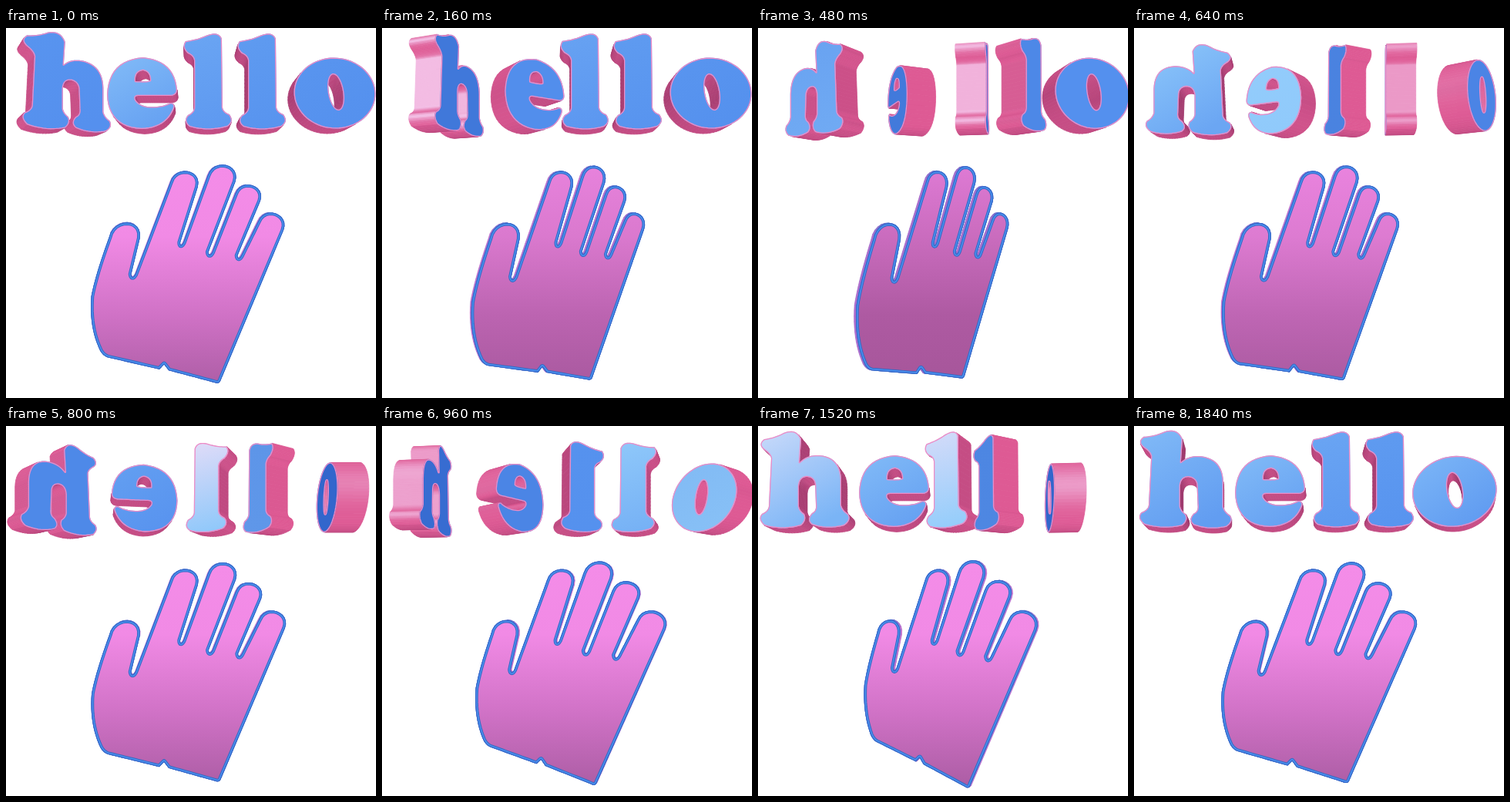
Animation, 480 px wide and 480 px high, one loop 1.92 s. Source, as an HTML page with a canvas:

```html
<!DOCTYPE html>
<html lang="en">
<head>
<meta charset="utf-8">
<title>hello</title>
<style>
html, body { margin: 0; width: 100%; height: 100%; overflow: hidden; background: #fff; }
canvas { display: block; width: 100vw; height: 100vh; }
</style>
</head>
<body>
<canvas id="stage" width="480" height="480" aria-label="hello"></canvas>
<script>
const ctx = document.getElementById('stage').getContext('2d');
const LOOP = 1920, STEP = 80, MID = 240, FOCAL = 630, DEPTH = 37;
const SPIN = 1480, FIRST = -122, STAGGER = 138;

// Outlines as seen at rest, in stage pixels
const H = 'M8 17 Q22 15 33 9 Q50 2 56 17 L54 47 Q64 37 80 38 Q107 40 108 70 L108 103 Q110 110 117 114 Q122 122 112 129 Q90 135 70 128 Q62 122 70 113 Q76 110 75 102 L74 76 Q73 67 64 66 Q54 66 53 78 L53 104 Q54 110 60 114 Q64 122 56 129 Q32 136 8 129 Q-1 121 5 114 Q14 110 14 103 L17 42 Q16 36 8 31 Q-1 24 8 17 Z';
const E = 'M222 80 Q222 88 212 88 L172 88 Q166 88 168 93 Q175 104 196 102 Q206 101 213 97 Q220 97 218 104 Q208 130 176 131 Q132 129 131 86 Q133 41 178 38 Q219 42 222 80 Z M168 69 Q167 56 178 55 Q187 57 187 68 Q184 70 168 69 Z';
const L = 'M233 17 Q248 15 259 10 Q276 3 280 14 L281 103 Q282 109 290 112 Q297 122 287 128 Q262 135 238 128 Q229 121 236 113 Q244 109 244 103 L244 42 Q243 36 236 33 Q227 25 233 17 Z';
const HAND = 'M135 271 C140 245 178 246 174 272 L163 318 Q164 325 168 318 L213 200 C219 178 255 182 249 206 L226 278 Q226 285 230 278 L262 191 C270 167 307 175 299 199 L263 291 Q264 298 268 291 L299 214 C307 193 341 203 333 224 L302 296 Q303 303 307 296 L330 251 C339 229 374 241 365 263 L279 460 Q277 464 272 462 L211 443 L205 435 L199 441 L134 423 Q128 421 124 414 Q110 384 113 345 Q118 318 135 271 Z';

function sample(path, dx = 0) {
  const rings = [];
  let ring, at;
  for (const [, cmd, args] of path.matchAll(/([MLQCZ])([^MLQCZ]*)/g)) {
    const n = args.trim().split(/\s+/).map(Number);
    const pts = [];
    for (let i = 0; i + 1 < n.length; i += 2) pts.push([n[i] + dx, n[i + 1]]);
    if (cmd === 'Z') continue;
    if (cmd === 'M') { rings.push(ring = [at = pts[0]]); continue; }
    for (let k = 1; k <= 12; k++) ring.push(bezier([at, ...pts], k / 12));
    at = pts[pts.length - 1];
  }
  return rings;
}

function bezier(pts, u) {
  while (pts.length > 1)
    pts = pts.slice(1).map((p, i) => p.map((v, j) => pts[i][j] + (v - pts[i][j]) * u));
  return pts[0];
}

function ellipse(cx, cy, rx, ry, tilt) {
  return Array.from({ length: 72 }, (_, i) => {
    const a = i / 72 * 2 * Math.PI, x = rx * Math.cos(a), y = ry * Math.sin(a);
    return [cx + x * Math.cos(tilt) - y * Math.sin(tilt), cy + x * Math.sin(tilt) + y * Math.cos(tilt)];
  });
}

function area(ring) {
  return ring.reduce((sum, p, i) => {
    const q = ring[(i + 1) % ring.length];
    return sum + p[0] * q[1] - q[0] * p[1];
  }, 0) / 2;
}

// front and back are depths measured from the pivot
function solid(rings, front, back, pivot) {
  const s = (FOCAL - front) / FOCAL;
  rings = rings.map((ring, i) => {
    ring = ring.map(([x, y]) => [(x - MID) * s, (y - MID) * s]);
    ring = ring.filter((p, j) => {
      const q = ring[(j + 1) % ring.length];
      return Math.hypot(p[0] - q[0], p[1] - q[1]) > 0.01;
    });
    return (area(ring) > 0) === (i === 0) ? ring : ring.reverse();
  });
  const xs = rings[0].map(p => p[0]);
  const px = pivot === undefined ? (Math.min(...xs) + Math.max(...xs)) / 2 : pivot - MID;
  return { rings: rings.map(r => r.map(([x, y]) => [x - px, y])), front, back, px };
}

const letters = [
  sample(H), sample(E), sample(L), sample(L, 70),
  [ellipse(426.5, 84.5, 53, 46, 0.08), ellipse(428, 83, 9, 23, -0.17)]
].map(rings => solid(rings, DEPTH, 0));
const hand = solid(sample(HAND), 0, -4, 237);

const clamp = v => Math.max(0, Math.min(1, v));
const mix = (a, b, u) => a.map((v, i) => v + (b[i] - v) * clamp(u));
const rgb = c => `rgb(${c.map(Math.round).join()})`;
const deg = r => r * 180 / Math.PI;
const bell = v => Math.exp(-v * v / 2);

// Highlight on a cap turned by `turn` degrees at distance x from the middle
const shine = (turn, x) => bell((turn + 25 + 0.08 * x) / 15);

function letterFace(turn, box) {
  const base = mix([50, 102, 204], [84, 144, 238], 1.15 * Math.cos(turn * Math.PI / 180));
  const tone = (x, k) => {
    const s = shine(turn, x - MID);
    return rgb(mix(mix(base, [166, 222, 255], s * k), [244, 220, 246], (s * k - 0.8) * 4));
  };
  const g = ctx.createLinearGradient(box.x0, box.y0, box.x0 + (box.x1 - box.x0) * 0.6, box.y1);
  g.addColorStop(0, tone(box.x0, 1));
  g.addColorStop(1, tone(box.x1, 0.78));
  return g;
}

function letterSide(n) {
  const base = mix([146, 50, 100], [222, 90, 148], 0.3 + 0.8 * n[2] + 0.35 * Math.abs(n[1]));
  const glint = bell((deg(Math.atan2(n[0], n[2])) + 17) / 12) * bell((n[1] + 0.15) / 0.4);
  return mix(base, [246, 204, 240], 0.95 * glint);
}

function handFace(turn) {
  const dim = clamp((turn - 12) / 28);
  const g = ctx.createLinearGradient(0, 180, 0, 462);
  g.addColorStop(0, rgb(mix([244, 140, 232], [222, 122, 212], dim)));
  g.addColorStop(0.32, rgb(mix([241, 138, 229], [202, 108, 190], dim)));
  g.addColorStop(0.68, rgb(mix([208, 114, 198], [174, 90, 162], dim)));
  g.addColorStop(1, rgb(mix([174, 94, 166], [166, 86, 154], dim)));
  return g;
}

const handSide = n => mix([70, 100, 200], [206, 112, 206], Math.abs(n[0]));

function trace(rings) {
  ctx.beginPath();
  for (const ring of rings) {
    ring.forEach(([x, y], i) => i ? ctx.lineTo(x, y) : ctx.moveTo(x, y));
    ctx.closePath();
  }
}

function draw(body, turn, face, side, rims) {
  const c = Math.cos(turn * Math.PI / 180), s = Math.sin(turn * Math.PI / 180);
  const project = z => ([x, y]) => {
    const depth = z * c - x * s, k = FOCAL / (FOCAL - depth);
    return [MID + (body.px + x * c + z * s) * k, MID + y * k, depth];
  };
  const caps = [body.front, body.back].map(z => body.rings.map(r => r.map(project(z))));
  const quads = [];
  body.rings.forEach((ring, r) => ring.forEach((p, i) => {
    const j = (i + 1) % ring.length, q = ring[j];
    const quad = [caps[0][r][i], caps[0][r][j], caps[1][r][j], caps[1][r][i]];
    if (area(quad) >= 0) return;
    const dx = q[0] - p[0], dy = q[1] - p[1], len = Math.hypot(dx, dy);
    const nx = dy / len, n = [nx * c, -dx / len, -nx * s];
    const x = (quad[0][0] + quad[2][0]) / 2;
    const y = (quad[0][1] + quad[2][1]) / 2;
    const z = quad.reduce((sum, v) => sum + v[2], 0) / 4;
    const far = Math.hypot(x - MID, y - MID, FOCAL) * (FOCAL - z) / FOCAL;
    quads.push({ quad, far, color: rgb(side(n)) });
  }));
  quads.sort((a, b) => b.far - a.far);
  ctx.lineJoin = 'round';
  for (const { quad, color } of quads) {
    trace([quad]);
    ctx.fillStyle = ctx.strokeStyle = color;
    ctx.lineWidth = 0.8;
    ctx.fill();
    ctx.stroke();
  }

  const size = caps.map(cap => area(cap[0]));
  const cap = size[0] > 0 ? caps[0] : size[1] < 0 ? caps[1] : null;
  if (!cap) return;
  const tilt = deg(cap === caps[0] ? Math.atan2(s, c) : Math.atan2(-s, -c));
  const xs = cap[0].map(p => p[0]), ys = cap[0].map(p => p[1]);
  const box = { x0: Math.min(...xs), x1: Math.max(...xs), y0: Math.min(...ys), y1: Math.max(...ys) };
  ctx.save();
  trace(cap);
  ctx.fillStyle = face(tilt, box);
  ctx.fill('evenodd');
  ctx.clip('evenodd');
  for (const [color, width] of rims) {
    ctx.strokeStyle = color;
    ctx.lineWidth = width;
    trace(cap);
    ctx.stroke();
  }
  ctx.restore();
}

const LETTER_RIM = [['#ee8cc6', 2.6]];
const HAND_RIM = [['#3569c4', 7.4], ['#4a8eee', 5.4], ['#3468c6', 2.2]];

function spin(i, t) {
  let since = t - FIRST - i * STAGGER;
  since = (since % LOOP + LOOP) % LOOP;
  return 360 * clamp(since / SPIN);
}

function sway(t) {
  const a = 2 * Math.PI * (t - 390) / LOOP;
  return 1 + 37 * Math.cos(a) + 4 * Math.cos(2 * a);
}

function render(now) {
  const t = Math.floor(now % LOOP / STEP) * STEP;
  ctx.clearRect(0, 0, 480, 480);
  letters.forEach((body, i) => draw(body, spin(i, t), letterFace, letterSide, LETTER_RIM));
  draw(hand, sway(t), handFace, handSide, HAND_RIM);
}

const start = performance.now();
function tick() {
  render(performance.now() - start);
  requestAnimationFrame(tick);
}
tick();
</script>
</body>
</html>
```
